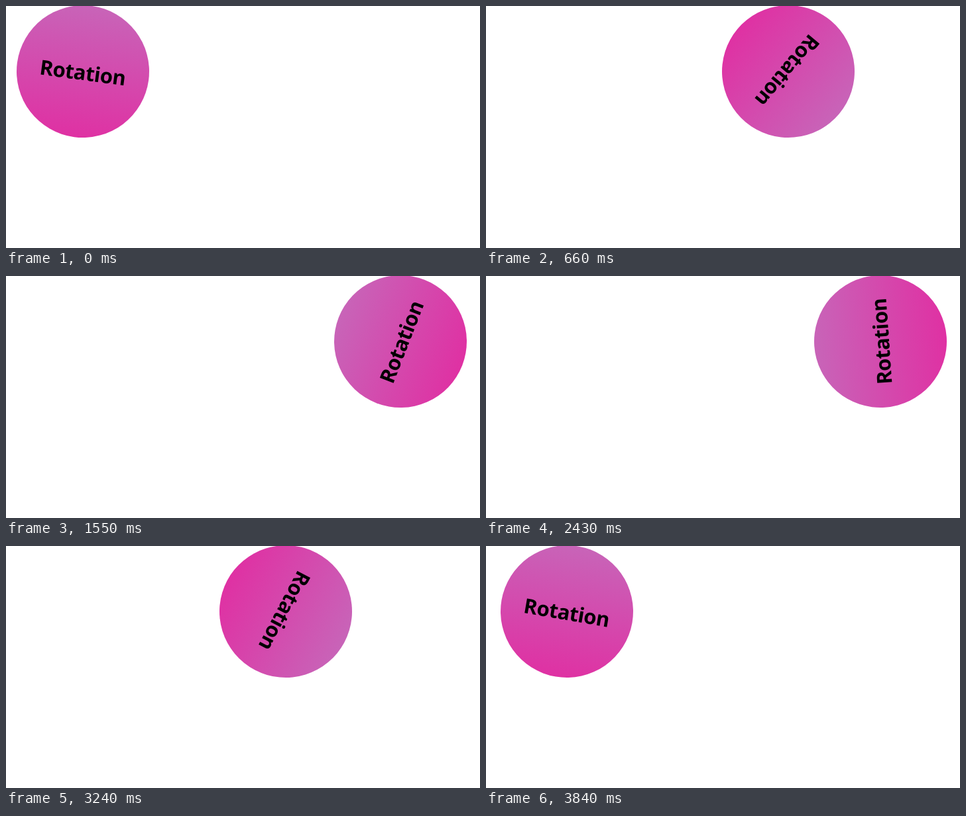
Recreate the animation shown at these times as an HTML page. Size 715x366 px, loop 3910 ms.

```html
<!DOCTYPE html>
<html lang="en">
<head>
<meta charset="utf-8">
<title>Rotation</title>
<style>
  html, body { margin: 0; width: 100%; height: 100%; overflow: hidden; background: #fff; }
  svg { display: block; width: 715px; height: 366px; }
  text { font: 700 31px "Open Sans", "Noto Sans", sans-serif; letter-spacing: -0.5px; text-anchor: middle; }
</style>
</head>
<body>
<svg viewBox="0 0 715 366">
  <defs>
    <linearGradient id="pink" x1="0" y1="0" x2="0" y2="1">
      <stop offset="0" stop-color="#c864b8"/>
      <stop offset="1" stop-color="#df31a3"/>
    </linearGradient>
  </defs>
  <g id="ball">
    <circle r="100" fill="url(#pink)"/>
    <text y="13">Rotation</text>
  </g>
</svg>
<script>
  const LOOP = 3910, GROUP = 590, LAST = 52;
  const starts = [0, 70, 150, 220, 290, 370, 450, 520];
  const ball = document.getElementById('ball');

  // The picture advances in uneven 70/80 ms steps, eight to a group.
  function stepAt(t) {
    if (t >= 3840) return LAST;
    const group = Math.floor(t / GROUP);
    const rest = t - group * GROUP;
    const step = group * 8 + starts.filter(s => s <= rest).length - 1;
    return Math.min(step, LAST - 1);
  }

  // Two seconds out and two back: one full turn, rolling 500px in the first half.
  function pose(step) {
    const time = 42 + 8 * Math.ceil(step * 75 / 8);
    const phase = time <= 2000 ? time : 4000 - time;
    return { x: 95 + Math.min(phase, 1000) / 2, angle: phase * 0.18 };
  }

  function draw(t) {
    const { x, angle } = pose(stepAt(t % LOOP));
    ball.setAttribute('transform', `translate(${x} 99) rotate(${angle})`);
  }

  const begin = performance.now();
  function tick() {
    draw(performance.now() - begin);
    requestAnimationFrame(tick);
  }
  tick();
</script>
</body>
</html>
```
